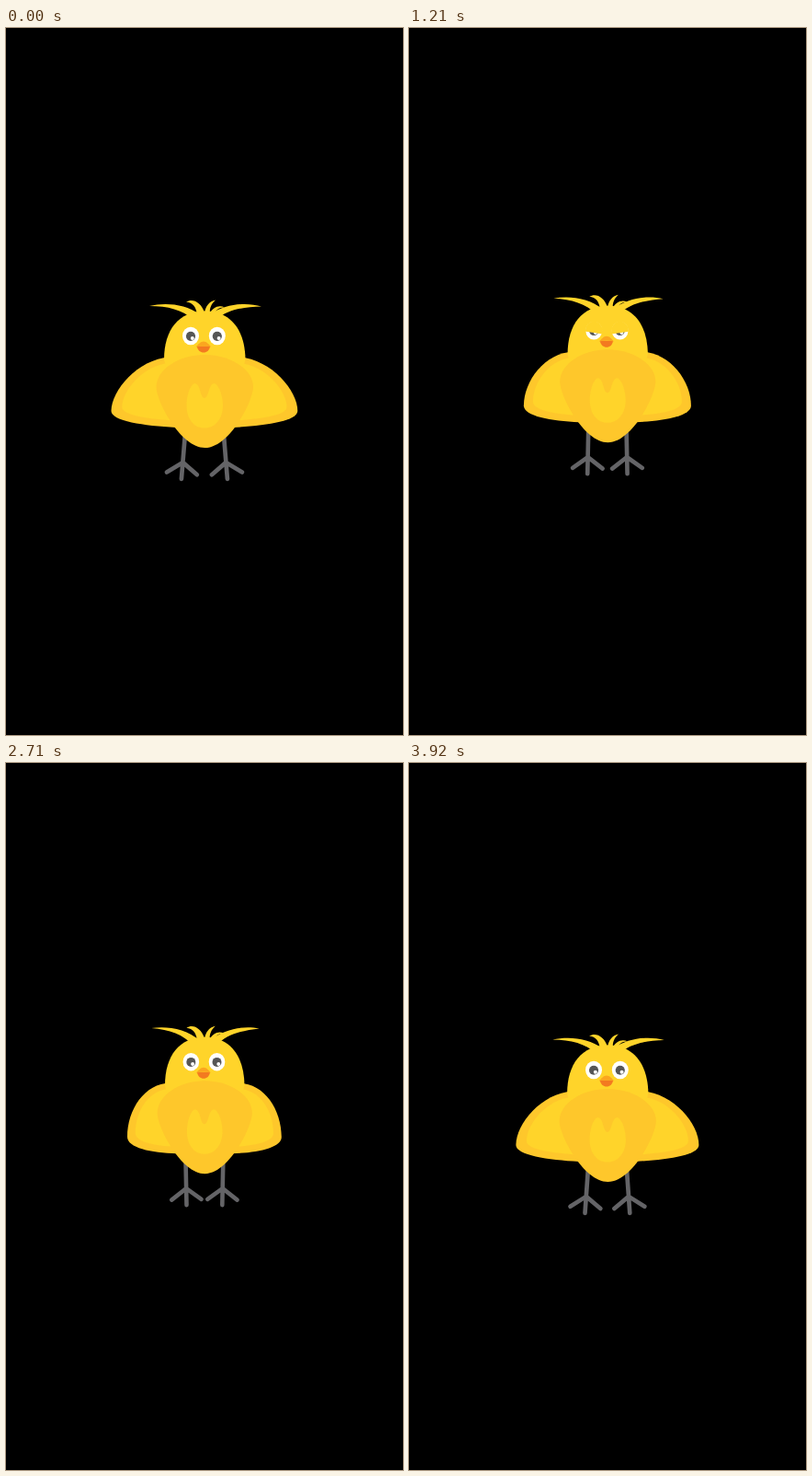
Recreate the animation shown at these times as an HTML page. Size 432 by 768 pixels, loop 3.96 s.

```html
<!DOCTYPE html>
<html lang="en">
<head>
<meta charset="utf-8">
<title>Chick</title>
<style>
  html, body { margin: 0; width: 100%; height: 100%; overflow: hidden; background: #000; }
  svg { display: block; width: 100vw; height: 100vh; }
  .light { fill: #ffd42a; }
  .deep { fill: #fec72b; }
</style>
</head>
<body>
<svg viewBox="0 0 432 768">
  <defs>
    <clipPath id="eyeClip"><ellipse rx="9.4" ry="10.2"/></clipPath>
    <g id="eye">
      <ellipse rx="9" ry="9.8" fill="#fff"/>
      <circle cy=".3" r="5.1" fill="#565656"/>
      <circle cx="1.8" cy="2.4" r="2" fill="#fff"/>
    </g>
    <rect id="lid" class="light" x="-14" y="-26" width="28" height="26"/>
  </defs>

  <g id="chick">
    <g id="side">
      <path id="leg" d="M195 436V490M178.5 484L195 472L211.5 484" fill="none"
        stroke="#646467" stroke-width="4.7" stroke-linecap="round" stroke-linejoin="round"/>
      <path id="wing" class="deep"/>
      <path id="wingInner" class="light" transform="translate(32.4 70.7) scale(.82)"/>
    </g>
    <use href="#side" transform="translate(431.8) scale(-1 1)"/>

    <g class="light">
      <path id="plumeL" d="M156 302C173 298 195 299.5 210.5 311L204 317C192 306 176 302 156 302Z"/>
      <path id="plumeR" d="M278 302.5C262 298 240 299 222 311L229 317C240 306 258 303 278 302.5Z"/>
      <path d="M196 297.5C203 293.5 212 297 216.5 310L208 312C207 303 203 298 196 297.5Z"/>
      <path d="M228 295.5C221 296.5 216.5 303 216 311L222 311C221 304 224 299 228 295.5Z"/>
      <path d="M238 303.5C232 300.5 225 303 221 311L226 312C228 306 232 303 238 303.5Z"/>
      <path d="M172 360C172 328 188 307.5 216.3 307.5S260 328 260.5 360L250 400H182Z"/>
    </g>
    <path class="deep" d="M163.5 390C163.5 371 188 355 216.3 355S269 371 269 390C269 405 243 456 216.3 456S163.5 405 163.5 390Z"/>
    <path class="light" d="M205 386C212 386 211 402 216 402S220 386 227 386C233 389 236 402 236 410C236 424 228 434.5 216 434.5S196.5 424 196.5 410C196.5 402 199 389 205 386Z"/>

    <g transform="translate(201 334.5)">
      <use href="#eye"/>
      <g clip-path="url(#eyeClip)"><use id="lidL" href="#lid"/></g>
    </g>
    <g transform="translate(229.8 334.5)">
      <use href="#eye"/>
      <g clip-path="url(#eyeClip)"><use id="lidR" href="#lid"/></g>
    </g>

    <path fill="#f37a20" d="M207.5 345.5H222.3C221 350.5 218.5 352.5 215 352.5S209 350.5 207.5 345.5Z"/>
    <path fill="#fba61f" d="M207 346.5C209 343.5 212 340.5 215 340.5S221 343.5 223 346.5C218 345 212 345 207 346.5Z"/>
  </g>
</svg>
<script>
const LOOP = 3960, FPS = 24;
const part = id => document.getElementById(id);
const move = (id, transform) => part(id).setAttribute('transform', transform);
const smooth = (from, to, t) => {
  const k = Math.min(1, Math.max(0, (t - from) / (to - from)));
  return k * k * (3 - 2 * k);
};

function wingPath(u) {
  const mix = (a, b) => (a + (b - a) * u).toFixed(2);
  const tip = mix(114.5, 139.3);
  return `M${mix(178, 179)} 357.5C${mix(143, 154)} ${mix(360, 355)} ${tip} ${mix(394, 381)} ${tip} 416` +
    `C${tip} ${mix(427, 428)} ${mix(150, 160)} ${mix(432, 434)} 185 434L216 434V357.5Z`;
}

function draw(t) {
  const u = (1 - Math.cos(2 * Math.PI * t)) / 2; // 0 = low, wings spread; 1 = high, wings in
  move('chick', `translate(216.3 ${-15.6 * u}) scale(${1 - .035 * u} 1) translate(-216.3)`);
  const d = wingPath(u);
  part('wing').setAttribute('d', d);
  part('wingInner').setAttribute('d', d);
  move('leg', `rotate(${4.7 - 9.4 * u} 195 440)`);
  move('plumeL', `rotate(${7.5 * u} 207 312)`);
  move('plumeR', `rotate(${-7.5 * u} 226 313)`);

  const lid = -13.5 + 15.8 * (smooth(.2, .4, t) - smooth(1.4, 1.6, t));
  move('lidL', `translate(0 ${lid}) rotate(8)`);
  move('lidR', `translate(0 ${lid}) rotate(-8)`);
}

function tick() {
  const ms = performance.now() % LOOP;
  draw(Math.floor((ms + 4) * FPS / 1000) / FPS);
  requestAnimationFrame(tick);
}
tick();
</script>
</body>
</html>
```
